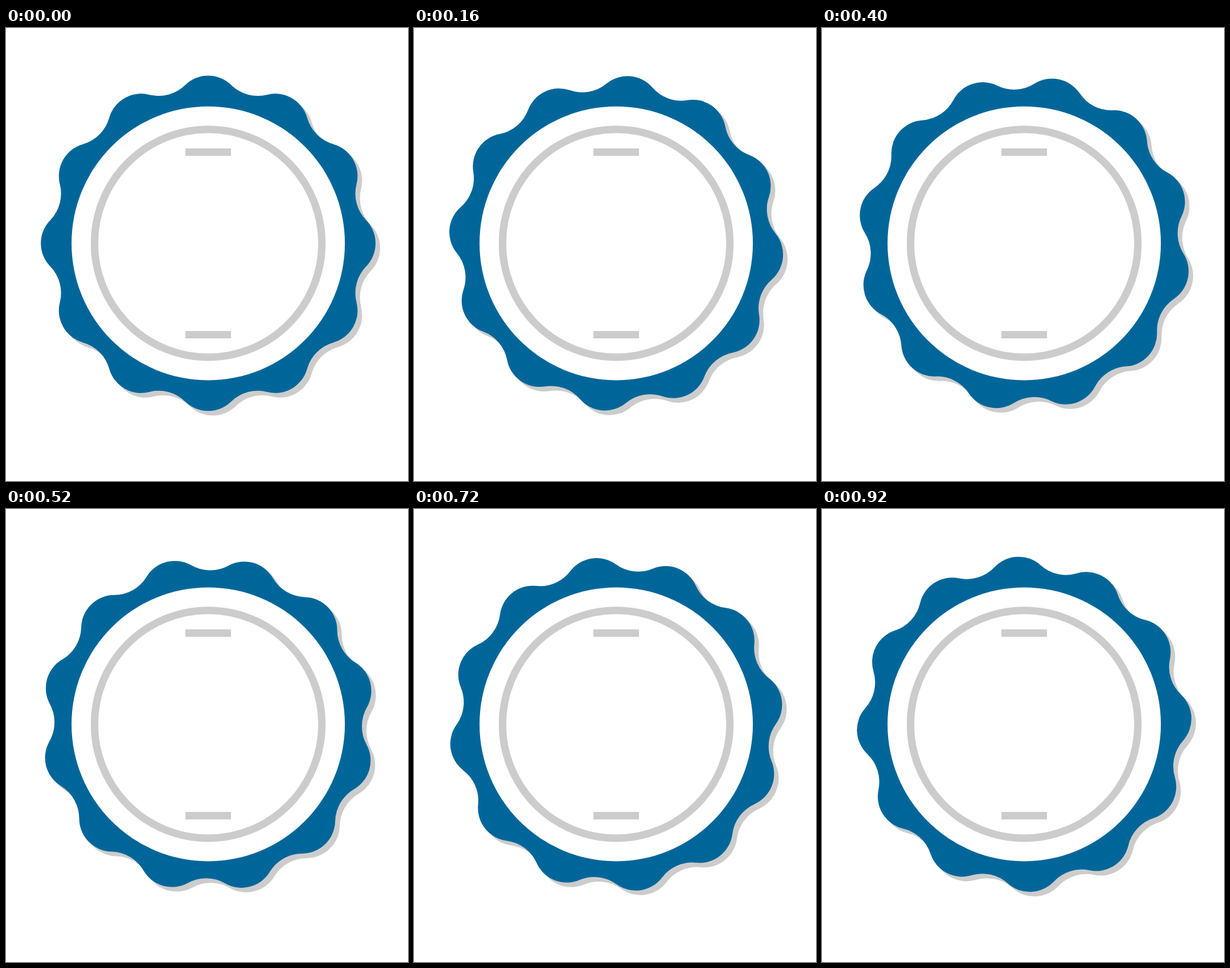
Animation, 706 px wide and 794 px high, one loop 960 ms. Source, as an HTML page:

```html
<!DOCTYPE html>
<html lang="en">
<head>
<meta charset="utf-8">
<title>Rotating badge</title>
<style>
  html, body { margin: 0; width: 100%; height: 100%; overflow: hidden; background: #fff; }
  svg { display: block; width: 706px; height: 794px; }
</style>
</head>
<body>
<svg viewBox="0 0 706 794">
  <defs><path id="rosette"/></defs>
  <g transform="translate(355.1 377.4)">
    <use href="#rosette" x="8" y="8" fill="#ccc"/>
    <use href="#rosette" fill="#069"/>
    <circle r="240" fill="#fff"/>
    <g fill="none" stroke="#ccc" stroke-width="13">
      <circle r="199.7"/>
      <path d="M-40 -160H40M-40 160H40"/>
    </g>
  </g>
</svg>
<script>
  const LOBES = 12, LOBE_RADIUS = 58, VALLEY_RADIUS = 67;
  const JOIN_RADIUS = 280.4, JOIN_ANGLE = 8.29;
  const STEP_MS = 40, STEP_ANGLE = 1.2, LOOP_MS = 960;
  const rosette = document.getElementById('rosette');

  function point(degrees) {
    const a = degrees * Math.PI / 180;
    return `${JOIN_RADIUS * Math.sin(a)} ${-JOIN_RADIUS * Math.cos(a)}`;
  }

  const arc = (radius, sweep, degrees) => `A${radius} ${radius} 0 0 ${sweep} ${point(degrees)}`;

  let outline = `M${point(-JOIN_ANGLE)}`;
  for (let i = 0; i < LOBES; i++) {
    const angle = i * 360 / LOBES;
    outline += arc(LOBE_RADIUS, 1, angle + JOIN_ANGLE);
    outline += arc(VALLEY_RADIUS, 0, angle + 360 / LOBES - JOIN_ANGLE);
  }
  rosette.setAttribute('d', outline + 'Z');

  const start = performance.now();
  function draw() {
    const time = (performance.now() - start) % LOOP_MS;
    const angle = Math.floor(time / STEP_MS) * STEP_ANGLE;
    rosette.setAttribute('transform', `rotate(${angle})`);
    requestAnimationFrame(draw);
  }
  draw();
</script>
</body>
</html>
```
